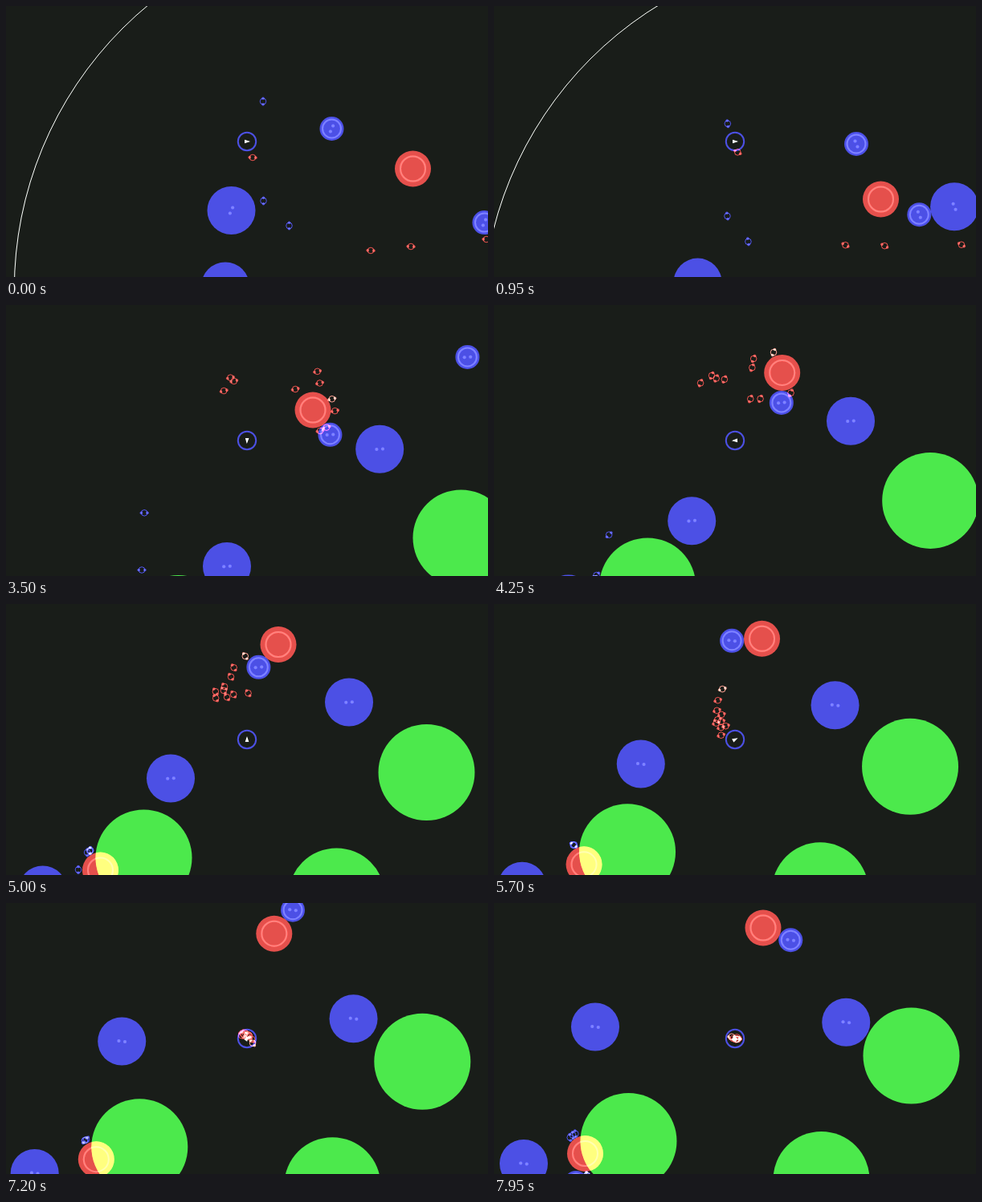
Recreate the animation shown at these times as an HTML page with a canvas. Size 600 by 338 pixels, loop 8000 ms.

```html
<!DOCTYPE html>
<html lang="en">
<head>
<meta charset="utf-8">
<title>Space</title>
<style>
html, body { margin: 0; width: 100%; height: 100%; overflow: hidden; background: #191d19; }
canvas { display: block; width: 600px; height: 338px; }
</style>
</head>
<body>
<canvas id="stage" width="600" height="338"></canvas>
<script>
const ctx = document.getElementById('stage').getContext('2d');
const STEPS = 160, DT = 0.05, TAU = Math.PI * 2, DEG = Math.PI / 180;
const RED = 'rgb(204,51,51)', GREEN = 'rgb(51,204,51)', BLUE = 'rgb(51,51,204)', PALE = 'rgb(225,130,120)';
const SHIP = { x: 300, y: 169 };

// Flight: time, screen position of the fixed red planet (the world's origin), ship heading.
const flight = [
  [0, 506.5, 203, 0], [0.95, 481.5, 241, 0], [2.3, 409.5, 221, 90], [3.5, 382, 131, 93],
  [5, 339, 50.5, 270], [6.45, 333.5, 44.5, 360], [7.95, 335, 31, 225]
];

// Fixed bodies in world coordinates.
const greens = [[184.5, 159.5], [-167.5, 266], [72.5, 314]].map(([x, y]) => ({ x, y, r: 60 }));
const reds = [{ x: 0, y: 0, r: 22.5 }, { x: -221.5, y: 281.5, r: 22.5 }];

// Moving planets: time, x, y at the points where their course bends.
const falling = [[0, -226, 52], [3.6, -240, 246], [4.9, -292, 305], [7.95, -298, 294]];
const rebounding = [[0, -233.5, 146.5], [3.5, -107, 195], [5, -134, 167], [7.95, -209, 123.5]];
const passing = [[0, -101, -50], [0.95, -30.5, -69], [5, 325, -62]];
const orbitAngle = [[0, 37], [2.3, 16], [5, 131], [6.45, 237], [7.95, 384]];

// Smooth curve through rows of [time, ...values].
function glide(keys, t) {
  const last = keys.length - 1;
  let i = 0;
  while (i < last - 1 && t > keys[i + 1][0]) i++;
  const span = keys[i + 1][0] - keys[i][0];
  const u = Math.min((t - keys[i][0]) / span, 1), v = 1 - u;
  return keys[i].slice(1).map((p, axis) => {
    const slope = k => {
      const a = keys[Math.max(k - 1, 0)], b = keys[Math.min(k + 1, last)];
      return (b[axis + 1] - a[axis + 1]) / (b[0] - a[0]);
    };
    const q = keys[i + 1][axis + 1];
    return p * (1 + 2 * u) * v * v + q * u * u * (3 - 2 * u)
      + span * (slope(i) * u * v * v - slope(i + 1) * u * u * v);
  });
}

function approaching(t) {
  return [78 + 55 * Math.exp(-1.5 * t) + 0.4 * t * t, 15.5 * t - 5.5];
}

function orbiting(t) {
  const r = Math.max(37.5, 111.4 - 63 * t), a = glide(orbitAngle, t)[0] * DEG;
  return [r * Math.cos(a), r * Math.sin(a)];
}

let seed = 11;
function random(from, to) {
  seed = (seed * 16807) % 2147483647;
  return from + (to - from) * seed / 2147483647;
}

// Red critters hunt the ship; blue ones gather at the second red planet.
function makeSwarm() {
  const critter = (color, x, y, vx, vy) => ({ color, x, y, vx, vy, speed: random(65, 105) });
  const hunter = (x, y) => critter(RED, x, y, 80, -40);
  const gatherer = (x, y) => critter(BLUE, x, y, 0, -120);
  const swarm = [
    hunter(-199.5, -14), hunter(-52.5, 102), hunter(-2.5, 97), hunter(91.5, 88),
    gatherer(-186.5, -84), gatherer(-186, 40), gatherer(-154, 71)
  ];
  for (let i = 0; i < 6; i++) swarm.push(hunter(random(115, 250), random(-50, 200)));
  for (let i = 0; i < 4; i++) swarm.push(gatherer(random(-330, -130), random(220, 330)));
  swarm[7].color = PALE;
  return swarm;
}

function advance(c, goal) {
  const dx = goal.x - c.x, dy = goal.y - c.y, d = Math.hypot(dx, dy) || 1;
  c.vx += (dx / d * c.speed - c.vx) * 1.5 * DT;
  c.vy += (dy / d * c.speed - c.vy) * 1.5 * DT;
  c.x += c.vx * DT;
  c.y += c.vy * DT;
  for (const body of [...greens, ...reds]) {
    const ox = c.x - body.x, oy = c.y - body.y, gap = Math.hypot(ox, oy) || 1;
    const push = Math.max(1, (body.r + 5) / gap);
    c.x = body.x + ox * push;
    c.y = body.y + oy * push;
  }
}

// The whole flight of the swarm is worked out once, one snapshot per step.
function simulate() {
  const swarm = makeSwarm(), snapshots = [];
  for (let step = 0; step < STEPS; step++) {
    snapshots.push(swarm.map(({ x, y, color }) => ({ x, y, color })));
    const [x, y] = glide(flight, step * DT);
    const ship = { x: SHIP.x - x, y: SHIP.y - y };
    swarm.forEach(c => advance(c, c.color === BLUE ? reds[1] : ship));
  }
  return snapshots;
}
const snapshots = simulate();

function disc(x, y, r, color) {
  ctx.fillStyle = color;
  ctx.beginPath();
  ctx.arc(x, y, r, 0, TAU);
  ctx.fill();
}

function ring(x, y, r, color, width) {
  ctx.strokeStyle = color;
  ctx.lineWidth = width;
  ctx.beginPath();
  ctx.arc(x, y, r, 0, TAU);
  ctx.stroke();
}

function pair(x, y, distance, degrees, r, color) {
  const dx = Math.cos(degrees * DEG) * distance, dy = Math.sin(degrees * DEG) * distance;
  disc(x + dx, y + dy, r, color);
  disc(x - dx, y - dy, r, color);
}

function bluePlanet([x, y], r, spin) {
  disc(x, y, r, BLUE);
  if (r < 20) ring(x, y, 11.5, BLUE, 2);
  pair(x, y, 3.8, spin, 2, BLUE);
}

function drawCritter({ x, y, color }, t) {
  const spin = color === BLUE ? 90 + 180 * t : 2 + 407 * t;
  ring(x, y, 3.8, color, 1);
  pair(x, y, 3.8, spin, 1.8, color);
}

function drawShip(heading) {
  ring(SHIP.x, SHIP.y, 11.2, BLUE, 2);
  ctx.save();
  ctx.translate(SHIP.x, SHIP.y);
  ctx.rotate(heading * DEG);
  ctx.fillStyle = '#fff';
  ctx.beginPath();
  ctx.moveTo(4, 0);
  ctx.lineTo(-3, -2.3);
  ctx.lineTo(-3, 2.3);
  ctx.fill();
  ctx.restore();
}

function draw(step) {
  const t = step * DT, [x, y, heading] = glide(flight, t);
  ctx.globalCompositeOperation = 'source-over';
  ctx.fillStyle = '#191d19';
  ctx.fillRect(0, 0, 600, 338);
  ctx.globalCompositeOperation = 'lighter';

  ctx.save();
  ctx.translate(x, y);
  ring(-35.5, 150.5, 460.7, 'rgba(255,255,255,.9)', 1);
  greens.forEach(g => disc(g.x, g.y, g.r, GREEN));
  reds.forEach(p => {
    disc(p.x, p.y, p.r, RED);
    ring(p.x, p.y, 15.5, RED, 2);
  });

  const spin = 115 - 240 * t;
  [approaching(t), glide(falling, t), glide(rebounding, t)].forEach(p => bluePlanet(p, 30, spin));
  [glide(passing, t), orbiting(t), [-233, 318]].forEach(p => bluePlanet(p, 15, spin));
  snapshots[step].forEach(c => drawCritter(c, t));
  ctx.restore();

  drawShip(heading);
}

const start = performance.now();
function frame() {
  draw(Math.floor((performance.now() - start) / (DT * 1000)) % STEPS);
  requestAnimationFrame(frame);
}
frame();
</script>
</body>
</html>
```
